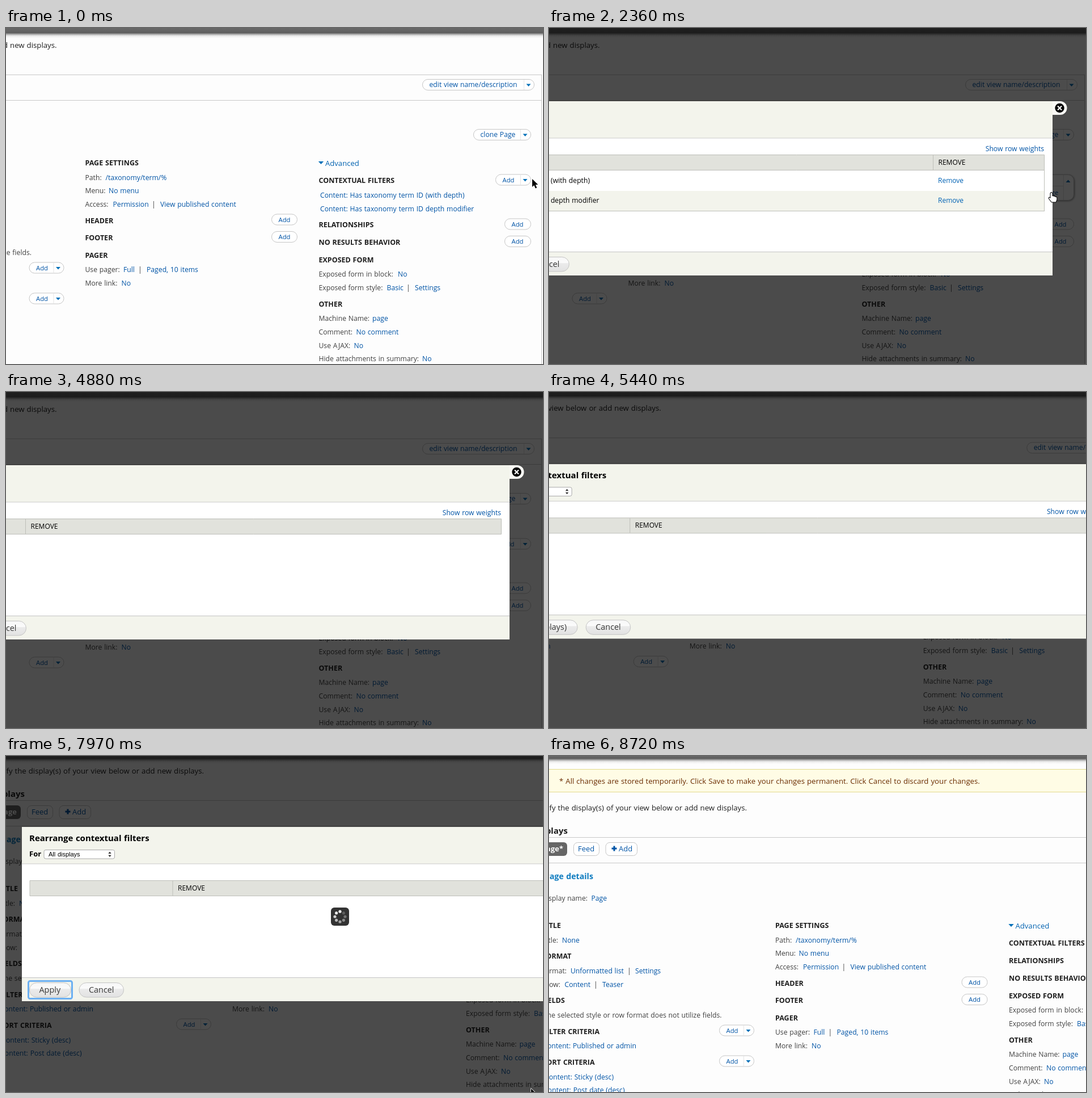
Write an HTML page with a canvas that moves like this. It is 947 by 592 pixels and loops after 9.82 s.

```html
<!DOCTYPE html>
<html lang="en">
<head>
<meta charset="utf-8">
<title>Rearrange contextual filters</title>
<style>
html, body { margin: 0; width: 100%; height: 100%; overflow: hidden; background: #fdfdfd; }
canvas { display: block; }
</style>
</head>
<body>
<canvas id="stage" width="947" height="592"></canvas>
<script>
const g = document.getElementById('stage').getContext('2d');
const LOOP = 9820, LINK = '#0054a6', GREY = '#404040', INK = '#1e1e1e', LEFT = -259.5;
const ARROW = new Path2D('M0 0v14l3.2-3 2.5 5.5 2.5-1.1-2.4-5.4h4.4z');
const HAND = new Path2D('M-2.5 1.5q1.5-3 3 0v5q2-1.5 2.7.6q2-1 2.7.8q2.4-.6 2.4 1.6v3l-1.5 4h-7.5l-4.5-6q-.5-2 1-1.8l1.7 1.5z');

// Cursor path in page coordinates: step, x, y
const PATH = [[0, 928, 266], [3, 915, 268], [4, 915, 268], [7, 887, 290], [18, 887, 290], [21, 709, 267],
  [28, 709, 267], [33, -120, 400], [43, -132.5, 410], [44, -132.5, 410], [48, 663.5, 567],
  [49, 663.5, 567], [54, 666.5, 590], [55, 667, 620]];

function text(s, x, y, color = LINK, size = 12.2, weight = 450, align = 'left', family = '"Open Sans", "Noto Sans"') {
  g.font = `${weight} ${size}px ${family}, sans-serif`;
  g.textAlign = align;
  g.fillStyle = color;
  g.fillText(s, x, y);
}
const label = (s, x, y, align) => text(s, x, y, GREY, 12.2, 450, align);
const head = (s, x, y, align) => text(s, x, y, INK, 12.5, 700, align);
const right = (s, x, y) => text(s, x, y, LINK, 12.2, 450, 'right');

function rect(x, y, w, h, color) {
  g.fillStyle = color;
  g.fillRect(x, y, w, h);
}
function box(x, y, w, h, r, fill, stroke) {
  g.beginPath();
  g.roundRect(x, y, w, h, r);
  if (fill) { g.fillStyle = fill; g.fill(); }
  if (stroke) { g.strokeStyle = stroke; g.lineWidth = 1; g.stroke(); }
}
function dot(x, y, r, color) {
  g.beginPath();
  g.arc(x, y, r, 0, 7);
  g.fillStyle = color;
  g.fill();
}
function triangle(x, y, w, h, color = '#0070b8') {
  g.beginPath();
  g.moveTo(x - w, y);
  g.lineTo(x + w, y);
  g.lineTo(x, y + h);
  g.fillStyle = color;
  g.fill();
}
function pill(s, x, y, w, arrow, size = 11.3) {
  box(x + .5, y + .5, w - 1, 19, 10, '#fff', '#c6c6c6');
  text(s, x + 12.5, y + 14, LINK, size);
  if (arrow) {
    rect(x + w - 19, y + 1, 1, 18, '#e4e4e4');
    triangle(x + w - 10.5, y + 8.5, 4, 4.5);
  }
}

function leftColumn(saved) {
  const star = saved ? 6 : 0;
  g.save();
  g.translate(LEFT, 0);
  text('modify the display(s) of your view below or add new displays.', 349, 35, INK, 13.2, 450, 'right');
  text('Displays', 33, 76, INK, 15, 700, 'right');
  box(-30, 91, 56 + star, 24, 6, '#666');
  text(saved ? 'Page*' : 'Page', 19 + star, 107, '#fff', 13, 700, 'right');
  box(37.5 + star, 91.5, 45, 23, 7, '#fff', '#c6c6c6');
  text('Feed', 45 + star, 107, LINK, 13);
  box(94 + star, 91.5, 55.5, 23, 7, '#fff', '#c6c6c6');
  rect(104.5 + star, 100.5, 9, 3, LINK);
  rect(107.5 + star, 97.5, 3, 9, LINK);
  text('Add', 117 + star, 107, LINK, 13);
  text('Page details', 78, 156, '#0f7cc0', 14.2, 700, 'right');
  label('Display name:', 68, 193.5, 'right');
  text('Page', 74.5, 193.5);
  head('TITLE', 21, 242, 'right');
  label('Title:', 16, 268, 'right');
  text('None', 23, 268);
  head('FORMAT', 39.5, 296, 'right');
  label('Format:', 31, 322, 'right');
  text('Unformatted list', 38, 322);
  label('|', 138, 322);
  text('Settings', 152, 322);
  label('Show:', 20, 346, 'right');
  text('Content', 27.5, 346);
  label('|', 79, 346);
  text('Teaser', 94, 346);
  head('FIELDS', 28, 374, 'right');
  label('The selected style or row format does not utilize fields.', 304.5, 400, 'right');
  head('FILTER CRITERIA', 89, 428.5, 'right');
  pill('Add', 300, 412.5, 62, true);
  right('Content: Published or admin', 154, 454);
  head('SORT CRITERIA', 80.5, 482.5, 'right');
  pill('Add', 300, 466.5, 62, true);
  right('Content: Sticky (desc)', 114, 508.5);
  right('Content: Post date (desc)', 133.5, 532);
  g.restore();
}

function middleColumn() {
  head('PAGE SETTINGS', 139.5, 241.5);
  label('Path:', 139.5, 267.5);
  text('/taxonomy/term/%', 175.5, 267.5);
  label('Menu:', 139.5, 291);
  text('No menu', 181, 291);
  label('Access:', 139.5, 315);
  text('Permission', 188.5, 315);
  label('|', 257, 315);
  text('View published content', 272, 315);
  head('HEADER', 139.5, 343.5);
  pill('Add', 468, 327.5, 46);
  head('FOOTER', 139.5, 374);
  pill('Add', 468, 358, 46);
  head('PAGER', 139.5, 404.5);
  label('Use pager:', 139.5, 430);
  text('Full', 207, 430);
  label('|', 233, 430);
  text('Paged, 10 items', 248, 430);
  label('More link:', 139.5, 454);
  text('No', 203.5, 454);
}

function rightColumn(saved, open) {
  const x = 551.5;
  triangle(x + 4, 235, 4.7, 5);
  text('Advanced', 563, 242.5, '#0062b0', 13.1);
  head('CONTEXTUAL FILTERS', x, 273);
  if (!saved) {
    text('Content: Has taxonomy term ID (with depth)', 554, 299);
    text('Content: Has taxonomy term ID depth modifier', 554, 322.5);
  }
  g.save();
  if (saved) g.translate(0, -47);
  head('RELATIONSHIPS', x, 351);
  pill('Add', 879, 335.5, 47);
  head('NO RESULTS BEHAVIOR', x, 382);
  pill('Add', 879, 366, 47);
  head('EXPOSED FORM', x, 412.5);
  label('Exposed form in block:', x, 438);
  text('No', 691, 438);
  label('Exposed form style:', x, 462);
  text('Basic', 671.5, 462);
  label('|', 706, 462);
  text('Settings', 721, 462);
  head('OTHER', x, 490.5);
  label('Machine Name:', x, 516);
  text('page', 646, 516);
  label('Comment:', x, 540);
  text('No comment', 617.5, 540);
  label('Use AJAX:', x, 563.5);
  text('No', 613.5, 563.5);
  label('Hide attachments in summary:', x, 587);
  text('No', 734, 587);
  g.restore();

  if (!open) return pill('Add', 863, 257.5, 63, true);
  g.save();
  g.shadowColor = 'rgba(0,0,0,.35)';
  g.shadowBlur = 3;
  g.shadowOffsetX = g.shadowOffsetY = 1;
  box(832.5, 258.5, 93, 45, 10, '#fff', '#c2c2c2');
  g.restore();
  box(832.5, 258.5, 93, 45, 10, '#fff', '#c2c2c2');
  rect(833, 278, 74, 1, '#e2e2e2');
  rect(907, 259, 1, 44, '#e2e2e2');
  text('Add', 844, 272, LINK, 11.3);
  text('Rearrange', 844, 294, LINK, 11.3);
  triangle(915.5, 272, 4, -4.5);
}

function page(saved, open) {
  g.save();
  if (saved) g.translate(0, 65);
  rect(-300, 82, 1245, 1, '#c8c8c8');
  rect(-300, 127, 1245, 1, '#c8c8c8');
  rect(944, 82, 1, 600, '#c8c8c8');
  pill('edit view name/description', 734, 90, 198, true, 12.2);
  pill('clone Page', 824, 178, 102, true, 12.2);
  leftColumn(saved);
  middleColumn();
  rightColumn(saved, open);
  g.restore();

  if (saved) {
    rect(-300, 27, 1400, 41, '#e2da8c');
    rect(-300, 28, 1400, 39, '#fffce5');
    text('* All changes are stored temporarily. Click Save to make your changes permanent. Click Cancel to discard your changes.',
      18 + LEFT, 52.5, '#6a2c00', 13.2);
  }
  const bar = g.createLinearGradient(0, 0, 0, 18);
  [[0, '#686868'], [.36, '#646464'], [.44, '#565656'], [.56, '#8c8c8c'], [.67, '#c8c8c8'], [.8, '#eee'], [1, '#fdfdfd']]
    .forEach(([at, c]) => bar.addColorStop(at, c));
  rect(-300, 0, 1400, 18, bar);
}

function button(s, x, w) {
  const fill = g.createLinearGradient(0, 403, 0, 429);
  [[0, '#f6f6f6'], [.4, '#fbfbfb'], [.45, '#ebebeb'], [1, '#e2e2e2']].forEach(([at, c]) => fill.addColorStop(at, c));
  box(x + .5, 403.5, w - 1, 25.5, 13, fill, '#c4c4c4');
  text(s, x + 17.5, 421, '#3a3a3a', 14.4);
}

function modal(n) {
  const rows = n < 23 ? 2 : n < 28 ? 1 : 0;
  const split = rows ? 677 : 34, x0 = -218, edge = '#bebfb9', pale = '#f3f4ec';
  box(870, 129, 43.5, 24, [0, 12, 12, 0], '#f9f9f5');
  rect(-231.5, 129, 1119.5, 307, '#fff');
  rect(-231.5, 129, 1119.5, 65, pale);
  rect(-231.5, 193.5, 1119.5, 1, '#ccc');
  rect(-231.5, 394, 1119.5, 42, pale);
  rect(-231.5, 394, 1119.5, 1, '#c4c4c4');
  dot(900.5, 141, 8.2, '#000');
  g.strokeStyle = '#fff';
  g.lineWidth = 2.2;
  g.beginPath();
  for (const s of [-1, 1]) {
    g.moveTo(897, 141 - 3.5 * s);
    g.lineTo(904, 141 + 3.5 * s);
  }
  g.stroke();

  text('Rearrange contextual filters', 41 + LEFT, 154, '#000', 15, 700);
  text('For', 41 + LEFT, 181, '#000', 13, 700);
  box(67 + LEFT, 169.5, 124.5, 15.5, 3, '#fff', '#a8a8a8');
  text('All displays', 75 + LEFT, 181, '#000', 11, 400, 'left', '"Liberation Sans"');
  triangle(183 + LEFT, 176, 2.7, -3.5, '#333');
  triangle(183 + LEFT, 178.5, 2.7, 3.5, '#333');
  right('Show row weights', 873, 217);

  box(x0 + .5, 223.5, 1091, 27, 0, '#e1e2dc', edge);
  rect(split, 224, 1, 26, edge);
  text('REMOVE', split + 9.5, 241, '#000', 12);
  for (let i = 0; i < rows; i++) {
    const y = 251 + 36 * i, base = y + 21.5 - i * .5, second = rows === 1 || i === 1;
    rect(x0, y, 1091, 36, second ? pale : '#fff');
    text('Content: Has taxonomy term ID ' + (second ? 'depth modifier' : '(with depth)'),
      second ? 88.5 : 72, base, '#000', 12.2, 450, 'right');
    text('Remove', 686, base, '#0062b4', 12);
  }
  if (rows) {
    const h = rows * 36;
    rect(x0, 250 + h, 1092, 1, edge);
    rect(873, 250, 1, h, edge);
    rect(x0, 250, 1, h, edge);
    if (n > 20) rect(686, 274, 45, 1, '#0062b4');
  }

  const busy = n >= 45;
  if (busy) {
    g.strokeStyle = '#6cb0f2';
    g.lineWidth = 3;
    g.beginPath();
    g.roundRect(39.5 + LEFT, 400.5, 77, 31, 3);
    g.stroke();
  }
  button(busy ? 'Apply' : 'Apply (all displays)', 41 + LEFT, busy ? 74 : 161);
  button('Cancel', (busy ? 128.5 : 216) + LEFT, 79.5);
}

function spinner(n) {
  const lead = n + (n < 20 ? 5 : 2);
  box(313.5, 271, 32, 32, 6, '#333');
  for (let i = 0; i < 8; i++) {
    const a = i * Math.PI / 4, age = (lead - i + 64) % 8;
    const v = Math.round(255 - age * 23);
    dot(329.5 + 9 * Math.sin(a), 287 - 9 * Math.cos(a), 2.6, `rgb(${v},${v},${v})`);
  }
}

function cursor(n) {
  if (n >= 55) return;
  const i = PATH.findIndex(p => p[0] > n);
  const [a, x, y] = PATH[i - 1], [b, u, v] = PATH[i], k = (n - a) / (b - a);
  const hand = n > 1 && n < 29 && n !== 19 && n !== 20;
  const shape = hand ? HAND : ARROW;
  g.save();
  g.translate(x + (u - x) * k, y + (v - y) * k);
  g.lineJoin = 'round';
  g.lineWidth = hand ? 2 : 1.6;
  g.strokeStyle = hand ? '#000' : '#fff';
  g.stroke(shape);
  g.fillStyle = hand ? '#fff' : '#000';
  g.fill(shape);
  g.restore();
}

function draw(t) {
  const n = Math.floor((t + 14) / 147.2);
  const k = Math.min(1, Math.max(0, (n - 33) / 9)), pan = k * k * (3 - 2 * k);
  const saved = n >= 55;
  g.setTransform(1, 0, 0, 1, 0, 0);
  rect(0, 0, 947, 592, '#fdfdfd');
  g.translate(-LEFT * pan, -4 * pan);
  g.wordSpacing = '0.6px';
  page(saved, n >= 5 && n < 24);
  if (n >= 16 && !saved) {
    rect(-300, -10, 1600, 700, 'rgba(0,0,0,.7)');
    modal(n);
  }
  if ((n >= 9 && n < 16) || (n >= 50 && n < 59)) spinner(n === 15 ? 14 : n);
  cursor(n);
}

const start = performance.now();
function tick() {
  draw((performance.now() - start) % LOOP);
  requestAnimationFrame(tick);
}
tick();
</script>
</body>
</html>
```
